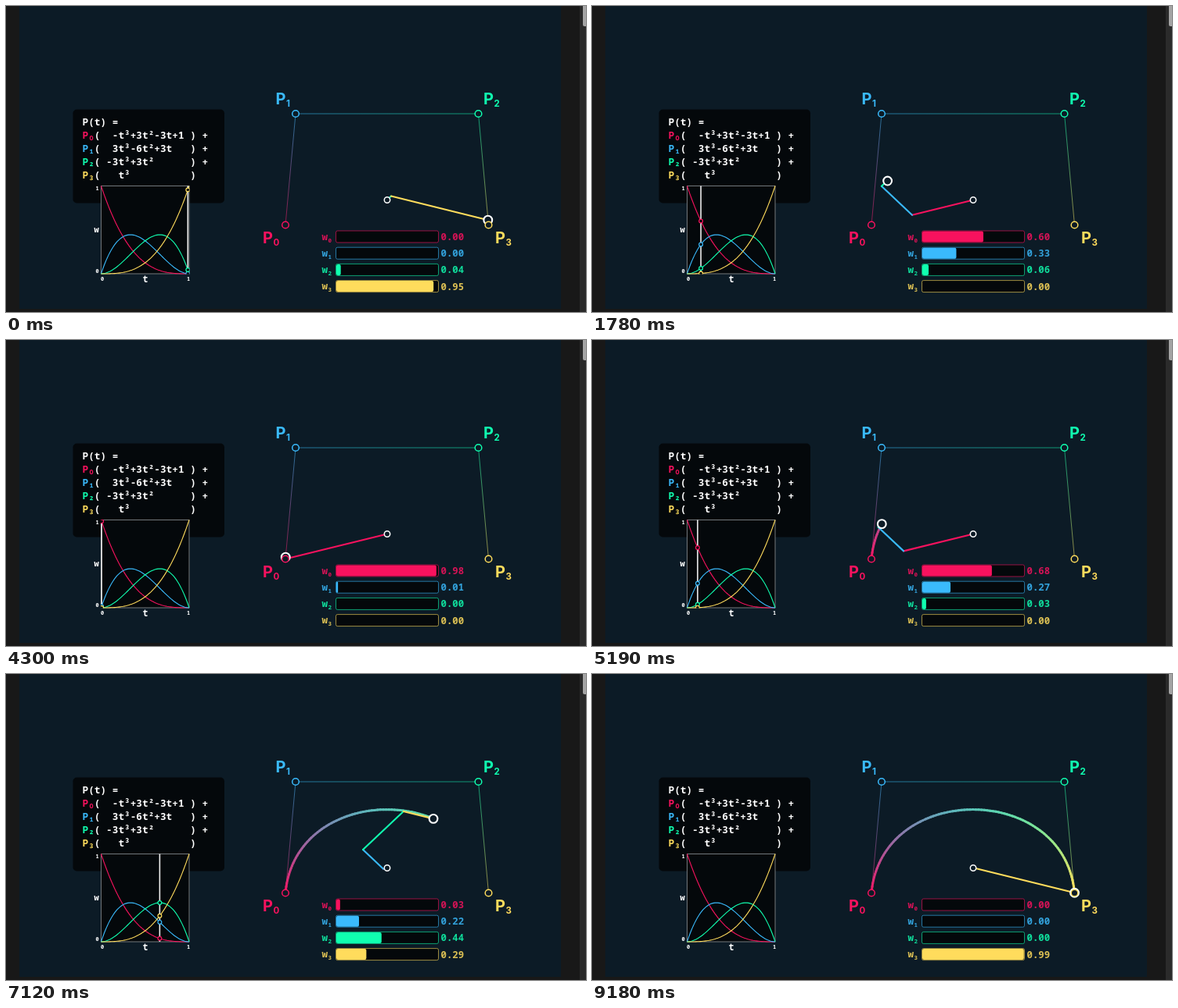
These frames come from a looping animation (741x392 px, 9280 ms). An HTML page with a canvas:

```html
<!DOCTYPE html>
<html lang="en">
<head>
<meta charset="utf-8">
<title>Cubic Bézier weights</title>
<style>
  html, body { margin: 0; width: 100%; height: 100%; overflow: hidden; background: #181818; }
  canvas { display: block; }
</style>
</head>
<body>
<canvas id="stage" width="741" height="392"></canvas>
<script>
const ctx = document.getElementById('stage').getContext('2d');
const LOOP = 9280, STEP = 148;
const BACK_END = 2470, BACK_TIME = 2680, FORWARD_START = 4054, FORWARD_TIME = 5020;
const BG = '#0c1b26', DARK = '#04080b', WHITE = '#fff';
const RGB = [[247, 18, 94], [58, 186, 252], [16, 255, 176], [255, 220, 92]];
const COLORS = RGB.map(c => `rgb(${c})`);
const POINTS = [[357, 280.5], [370, 138], [603.5, 138], [616.5, 280.5]];
const ORIGIN = [487, 248.5];
const GRAPH = { x: 121.5, y: 230.5, size: 112.5 };
const MONO = '"Noto Sans Mono", "DejaVu Sans Mono", monospace';

const weights = t => {
  const s = 1 - t;
  return [s * s * s, 3 * s * s * t, 3 * s * t * t, t * t * t];
};
const blend = (w, items) => items[0].map((_, axis) => w.reduce((sum, v, i) => sum + v * items[i][axis], 0));
const ease = u => (1 - Math.cos(Math.PI * Math.min(1, Math.max(0, u)))) / 2;

function text(str, x, y, size, color, weight = 600, family = MONO) {
  ctx.font = `${weight} ${size}px ${family}`;
  ctx.fillStyle = color;
  ctx.fillText(str, x, y);
}

function path(points, color, width) {
  ctx.beginPath();
  points.forEach(p => ctx.lineTo(...p));
  ctx.strokeStyle = color;
  ctx.lineWidth = width;
  ctx.stroke();
}

function ring([x, y], radius, color, width, fill = BG) {
  ctx.beginPath();
  ctx.arc(x, y, radius, 0, 2 * Math.PI);
  ctx.fillStyle = fill;
  ctx.fill();
  ctx.strokeStyle = color;
  ctx.lineWidth = width;
  ctx.stroke();
}

function box(x, y, w, h, r, fill) {
  ctx.beginPath();
  ctx.roundRect(x, y, w, h, r);
  ctx.fillStyle = fill;
  ctx.fill();
}

function drawPage() {
  ctx.fillStyle = '#181818';
  ctx.fillRect(0, 0, 741, 392);
  ctx.fillStyle = BG;
  ctx.fillRect(17, 0, 692, 388);
  ctx.fillStyle = '#2b2b2b';
  ctx.fillRect(733, 0, 8, 392);
  box(737, -5, 6, 31, 2, '#a5a5a5');
}

function drawFormula() {
  box(85.5, 132.5, 193.5, 120, 5, DARK);
  text('P(t) =', 97.5, 153.3, 12.75, WHITE);
  ['(  -t³+3t²-3t+1 ) +', '(  3t³-6t²+3t   ) +', '( -3t³+3t²      ) +', '(   t³          )'].forEach((row, i) => {
    const y = 170.3 + 16.8 * i;
    text('P' + '₀₁₂₃'[i], 97.5, y, 12.75, COLORS[i]);
    text(row, 112.8, y, 12.75, WHITE);
  });
}

function drawGraph(t, w) {
  const { x, y, size } = GRAPH;
  const at = (u, v) => [x + u * size, y + (1 - v) * size];
  ctx.fillStyle = DARK;
  ctx.fillRect(x, y, size, size);
  ctx.strokeStyle = '#74787b';
  ctx.lineWidth = 1;
  ctx.strokeRect(x, y, size, size);
  COLORS.forEach((color, i) => {
    path(Array.from({ length: 61 }, (_, k) => at(k / 60, weights(k / 60)[i])), color, 1.1);
  });
  if (t > 0.003 && t < 0.995) {
    ctx.save();
    ctx.beginPath();
    ctx.rect(x - 0.5, y - 0.5, size + 1, size + 1);
    ctx.clip();
    path([at(t, 0), at(t, 1)], '#eee', 1.6);
    w.forEach((v, i) => ring(at(t, v), 2.4, COLORS[i], 1.2, DARK));
    ctx.restore();
  }
  text('1', 114.5, 235.5, 7, WHITE);
  text('0', 114.5, 342, 7, WHITE);
  text('0', 121, 351.5, 7, WHITE);
  text('1', 231, 351.5, 7, WHITE);
  text('w', 112.5, 290, 10.5, WHITE);
  text('t', 174.5, 354, 11.5, WHITE);
}

function drawBars(w) {
  w.forEach((v, i) => {
    const y = 288 + 21.2 * i, color = COLORS[i];
    ctx.globalAlpha = 0.85;
    text('w', 403.5, y + 11.7, 12.5, color, 700);
    text(i, 411.5, y + 14.5, 7.5, color, 700);
    text((Math.floor(v * 100) / 100).toFixed(2), 555.5, y + 12, 12.3, color);
    ctx.globalAlpha = 1;
    box(421.5, y, 131, 15, 2, DARK);
    if (v > 0.004) box(422, y + 0.5, 130 * v, 14, 2, color);
    ctx.globalAlpha = 0.6;
    ctx.beginPath();
    ctx.roundRect(421.5, y, 131, 15, 2);
    ctx.strokeStyle = color;
    ctx.lineWidth = 1;
    ctx.stroke();
    ctx.globalAlpha = 1;
  });
}

function drawCurve(t) {
  const count = Math.ceil(t * 100);
  for (let k = 0; k < count; k++) {
    const a = weights(t * k / count), b = weights(t * (k + 1) / count);
    path([blend(a, POINTS), blend(b, POINTS)], `rgb(${blend(b, RGB).map(Math.round)})`, 3);
  }
}

function drawBezier(t, w, forward) {
  ctx.globalAlpha = 0.55;
  for (let i = 0; i < 3; i++) {
    const fade = ctx.createLinearGradient(...POINTS[i], ...POINTS[i + 1]);
    fade.addColorStop(0, COLORS[i]);
    fade.addColorStop(1, COLORS[i + 1]);
    path([POINTS[i], POINTS[i + 1]], fade, 1);
  }
  ctx.globalAlpha = 1;
  ctx.lineCap = 'round';
  if (forward) drawCurve(t);

  // The weighted vectors are laid end to end, from the origin to the curve point.
  let tip = ORIGIN;
  w.forEach((v, i) => {
    const next = tip.map((c, axis) => c + v * (POINTS[i][axis] - ORIGIN[axis]));
    if (v > 0.002) path([tip, next], COLORS[i], 2.1);
    tip = next;
  });
  ctx.lineCap = 'butt';
  ring(tip, 5.4, WHITE, 2.1);
  ring(ORIGIN, 3.7, WHITE, 1.5);
  POINTS.forEach((p, i) => ring(p, 4.3, COLORS[i], 1.5));
  [[328, 304], [344.5, 126], [610, 126], [625, 304]].forEach(([x, y], i) => {
    text('P', x, y, 20, COLORS[i], 700, 'Inter, sans-serif');
    text(i, x + 13.5, y + 3, 11.5, COLORS[i], 700, 'Inter, sans-serif');
  });
}

function draw(now) {
  const time = Math.floor(now % LOOP / STEP) * STEP;
  const forward = time >= FORWARD_START;
  const t = Math.min(0.9995, forward
    ? ease((time - FORWARD_START) / FORWARD_TIME)
    : ease((BACK_END - time) / BACK_TIME));
  const w = weights(t);
  drawPage();
  drawFormula();
  drawGraph(t, w);
  drawBezier(t, w, forward);
  drawBars(w);
  requestAnimationFrame(draw);
}
requestAnimationFrame(draw);
</script>
</body>
</html>
```
